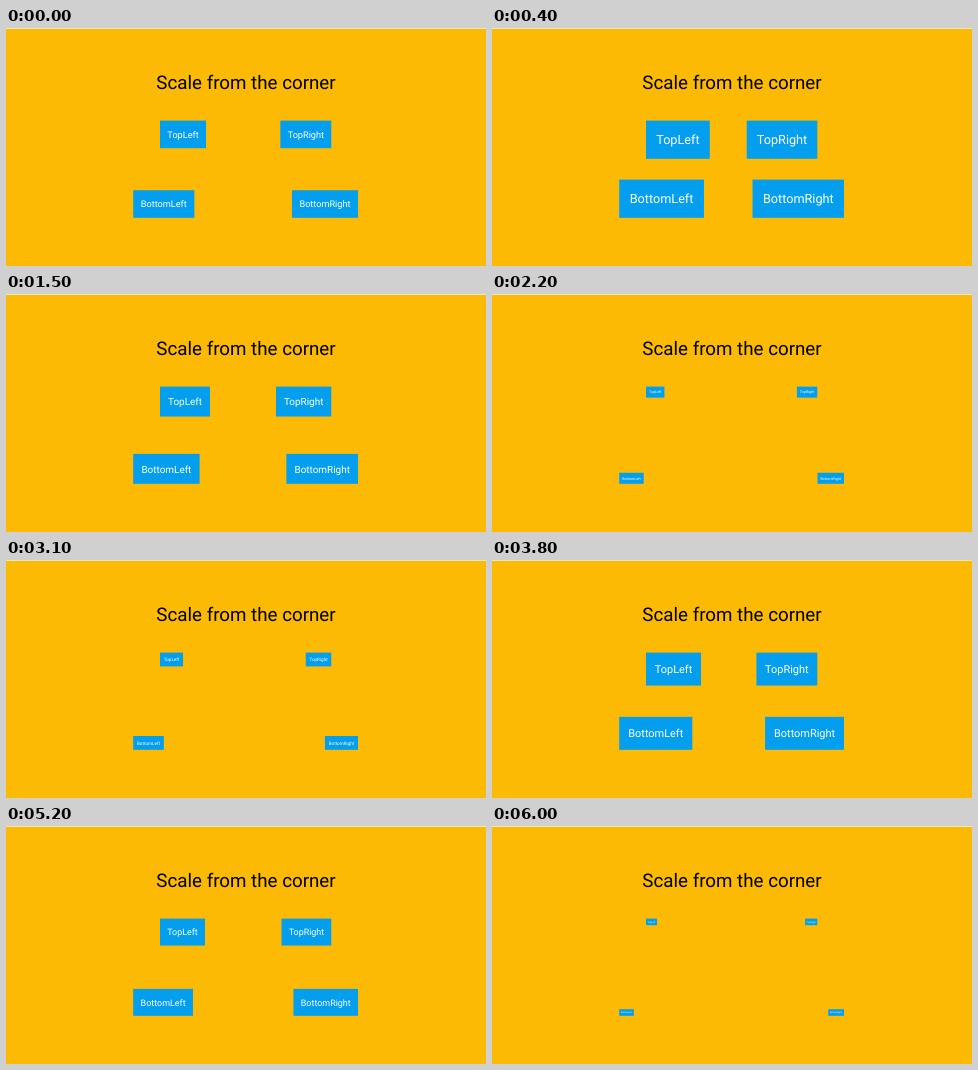
Write an HTML page that moves like this. It is 480 px wide and 238 px high and loops after 6100 ms.

```html
<!DOCTYPE html>
<html lang="en">
<head>
<meta charset="utf-8">
<title>Scale from the corner</title>
<style>
  html, body { margin: 0; width: 100%; height: 100%; overflow: hidden; background: #fcba04; }
  svg { display: block; width: 100vw; height: 100vh; }
  text { font-family: Roboto, sans-serif; text-anchor: middle; text-rendering: geometricPrecision; }
</style>
</head>
<body>
<svg id="stage" viewBox="0 0 480 238">
  <rect width="480" height="238" fill="#fcba04"/>
  <rect width="480" height="1" fill="#f6e6b8"/>
  <text x="240" y="61" font-size="18.75">Scale from the corner</text>
</svg>
<script>
const NS = "http://www.w3.org/2000/svg";
const LOOP = 6100, STEP = 100, HEIGHT = 48.8;
const stage = document.getElementById("stage");

// Anchor corner, full width, and direction the box grows in.
const boxes = [
  { label: "TopLeft", x: 154, y: 92.6, w: 81.5, dx: 1, dy: 1 },
  { label: "TopRight", x: 325.3, y: 92.6, w: 90.2, dx: -1, dy: 1 },
  { label: "BottomLeft", x: 127.2, y: 189.8, w: 108.3, dx: 1, dy: -1 },
  { label: "BottomRight", x: 352, y: 189.8, w: 116.9, dx: -1, dy: -1 }
];

// [time, scale], linear in between
const keys = [
  [0, 0.565], [800, 1], [1500, 0.613], [2600, 0.005], [3100, 0.283],
  [4380, 1], [5200, 0.552], [6000, 0.135], [6100, 0.08]
];

function add(parent, tag, attrs) {
  const el = document.createElementNS(NS, tag);
  for (const name in attrs) el.setAttribute(name, attrs[name]);
  return parent.appendChild(el);
}

for (const b of boxes) {
  b.group = add(stage, "g", {});
  const left = b.dx > 0 ? 0 : -b.w;
  const top = b.dy > 0 ? 0 : -HEIGHT;
  add(b.group, "rect", { x: left, y: top, width: b.w, height: HEIGHT, fill: "#039eee" });
  add(b.group, "text", { x: left + b.w / 2, y: top + 30.4, "font-size": 16.2, fill: "#fff" })
    .textContent = b.label;
}

function scaleAt(t) {
  const i = keys.findIndex(k => k[0] > t);
  const [t0, s0] = keys[i - 1], [t1, s1] = keys[i];
  return s0 + (s1 - s0) * (t - t0) / (t1 - t0);
}

function draw(t) {
  const s = scaleAt(Math.floor(t / STEP) * STEP);
  for (const b of boxes) {
    b.group.setAttribute("transform", `translate(${b.x} ${b.y}) scale(${s})`);
  }
}

const start = performance.now();
function tick() {
  draw((performance.now() - start) % LOOP);
  requestAnimationFrame(tick);
}
draw(0);
requestAnimationFrame(tick);
</script>
</body>
</html>
```
